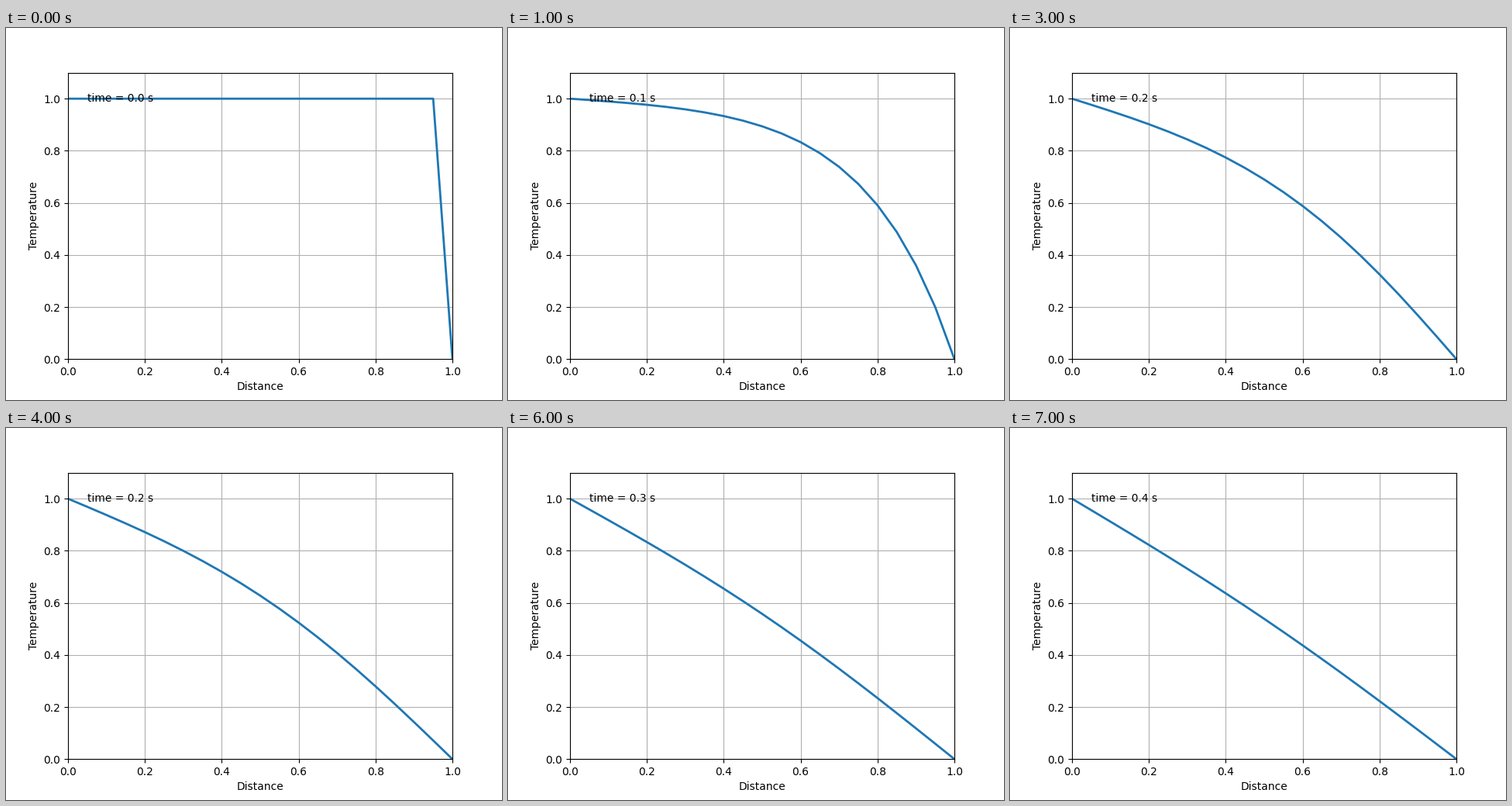
These frames come from a looping animation (640 px wide and 480 px high, 8000 ms). A matplotlib script:

```python
import numpy as np
import matplotlib.pyplot as plt
from matplotlib.animation import FuncAnimation

CELLS = 20
STEPS = 8
DT = 0.05


def solve_heat():
    """Implicit Euler for the 1D heat equation with fixed ends."""
    r = DT * CELLS**2
    size = CELLS + 1
    matrix = np.eye(size)
    for i in range(1, CELLS):
        matrix[i, i - 1:i + 2] = -r, 1 + 2 * r, -r
    temp = np.ones(size)
    temp[-1] = 0
    states = [temp]
    for _ in range(STEPS - 1):
        states.append(np.linalg.solve(matrix, states[-1]))
    return states


x = np.linspace(0, 1, CELLS + 1)
states = solve_heat()

fig, ax = plt.subplots(figsize=(6.4, 4.8), dpi=100)
ax.set(xlim=(0, 1), ylim=(0, 1.1), xlabel="Distance", ylabel="Temperature")
ax.grid()
line, = ax.plot(x, states[0], lw=2)
label = ax.text(0.05, 0.9, "", transform=ax.transAxes)


def update(step):
    line.set_ydata(states[step])
    label.set_text(f"time = {step * DT:.1f} s")
    return line, label


anim = FuncAnimation(fig, update, frames=STEPS, interval=1000,
                     repeat=True, repeat_delay=0, blit=False)
plt.show()
```
